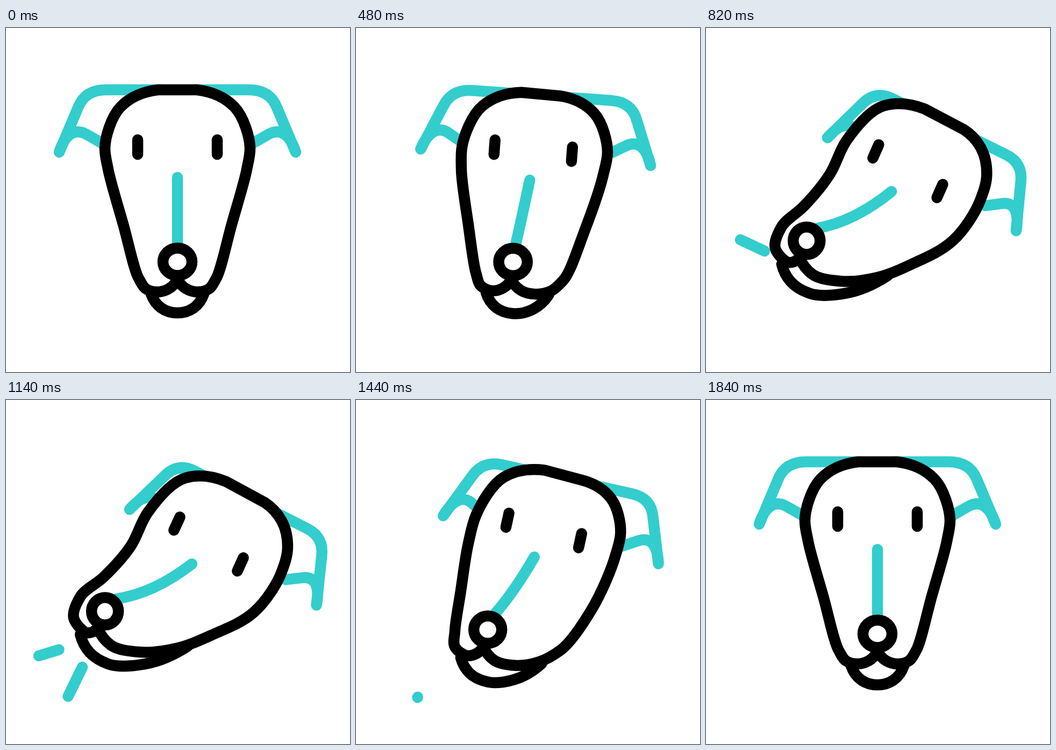
Animation, 640 px wide and 640 px high, one loop 2.4 s. Source, as an HTML page with a canvas:

```html
<!DOCTYPE html>
<html lang="en">
<head>
<meta charset="utf-8">
<title>Sniffing dog</title>
<style>
html, body { margin: 0; height: 100%; overflow: hidden; background: #fff; }
canvas { display: block; width: 100vw; height: 100vh; }
</style>
</head>
<body>
<canvas id="stage" width="640" height="640"></canvas>
<script>
const ctx = document.getElementById('stage').getContext('2d');
const TEAL = '#33cdcd', BLACK = '#000', LOOP = 2400;
const MID = 319, TOP = 115;   // symmetry axis and crown of the facing head

// Mirrored anchors: offset from the axis, y, then the left and right place when turned.
const FACE = [
  [0, 468, 170, 424, 170, 424],
  [16, 485, 162, 431, 195, 456],
  [37, 491, 151, 433, 250, 469],
  [59, 485, 126, 406, 317, 462],
  [72, 466, 138, 366, 383, 437],
  [101, 365, 182, 329, 461, 395],
  [129, 263, 232, 272, 512, 322],
  [135, 224, 264, 209, 524, 274],
  [106, 147, 334, 145, 513, 225],
  [36, 115, 410, 152, 482, 191]];
const CHIN = [
  [0, 530, 190, 491, 190, 491],
  [30, 521, 155, 469, 259, 491],
  [49, 495, 138, 436, 338, 458]];

// Sniff lines: inner end, outer end, start and end time.
const RAYS = [
  [109, 415, 64, 394, 670, 1025],
  [113, 460, 61, 476, 860, 1215],
  [142, 497, 114.5, 553.5, 1050, 1442]];

const clamp = x => Math.min(1, Math.max(0, x));
const mix = (a, b, k) => a + (b - a) * k;

// cubic-bezier(.75, 0, .25, 1)
function ease(x) {
  let lo = 0, hi = 1;
  for (let i = 0; i < 22; i++) {
    const s = (lo + hi) / 2;
    if (s * (2.25 - 3.75 * s + 2.5 * s * s) < x) lo = s; else hi = s;
  }
  return lo * lo * (3 - 2 * lo);
}

const turnAt = t =>
  1.012 * (ease(clamp((t - 160) / 850)) - ease(clamp((t - 1030) / 820)));

// Travel from the facing place (u, y) to the turned place (tx, ty) along a bowed path.
function move(u, y, tx, ty, p) {
  const v = y - TOP, bow = 4 * p * (1 - p);
  return [
    mix(MID + u, tx, p) + bow * (5 - .035 * v + .015 * u),
    mix(y, ty, p) + bow * (5.5 + 8.5 * Math.tanh((v - 210) / 70))];
}

const half = (rows, side, p) => rows.map(([u, y, lx, ly, rx, ry]) =>
  side < 0 ? move(-u, y, lx, ly, p) : move(u, y, rx, ry, p));

// Control point beside anchor i, towards its next (dir 1) or previous (dir -1) neighbour
function handle(pts, i, dir, k) {
  const [[ax, ay], [x, y], [bx, by]] = pts.slice(i - 1, i + 2);
  const la = Math.hypot(x - ax, y - ay), lb = Math.hypot(bx - x, by - y);
  const tx = ((x - ax) / la * lb + (bx - x) / lb * la) / (la + lb);
  const ty = ((y - ay) / la * lb + (by - y) / lb * la) / (la + lb);
  const h = dir * k * Math.min(dir > 0 ? lb : la, Math.sqrt(la * lb));
  return [x + tx * h, y + ty * h];
}

function spline(pts) {
  const last = pts.length - 1;
  ctx.lineTo(...pts[0]);
  for (let i = 0; i < last; i++) {
    const end = pts[i + 1];
    if (i === 0) ctx.quadraticCurveTo(...handle(pts, 1, -1, .52), ...end);
    else if (i + 1 === last) ctx.quadraticCurveTo(...handle(pts, i, 1, .52), ...end);
    else ctx.bezierCurveTo(...handle(pts, i, 1, .35), ...handle(pts, i + 1, -1, .35), ...end);
  }
}

function stroke(color, trace) {
  ctx.strokeStyle = color;
  ctx.beginPath();
  trace();
  ctx.stroke();
}

function ear(side, p) {
  const at = (offset, y) => {
    const u = side * offset, v = y - TOP;
    return move(u, y, 456 + .79 * u - .45 * v, 186 + .405 * u + .92 * v, p);
  };
  ctx.moveTo(...at(29, 115));
  ctx.lineTo(...at(133, 115));
  ctx.quadraticCurveTo(...at(172, 115), ...at(185, 148));
  ctx.lineTo(...at(220, 231));
  ctx.bezierCurveTo(...at(211, 202), ...at(193, 184), ...at(169, 198));
  ctx.lineTo(...at(139, 215));
}

function eye(side, p) {
  const [x, y] = move(side * 74, 221.5, 377 + side * 59, 268 + side * 38, p);
  const dx = -13.5 * Math.sin(.43 * p), dy = 13.5 * Math.cos(.43 * p);
  ctx.moveTo(x - dx, y - dy);
  ctx.lineTo(x + dx, y + dy);
}

function ray([x0, y0, x1, y1, start, end], t) {
  if (t <= start || t >= end) return;
  const k = (t - start) / (end - start);
  const head = 1 - (1 - clamp(k / .35)) ** 3;
  const tail = clamp((k - .4) / .6) ** 3;
  ctx.moveTo(mix(x0, x1, tail), mix(y0, y1, tail));
  ctx.lineTo(mix(x0, x1, head), mix(y0, y1, head));
}

function draw(t) {
  const p = turnAt(t);
  ctx.fillStyle = '#fff';
  ctx.fillRect(0, 0, 640, 640);
  ctx.lineWidth = 20.5;
  ctx.lineCap = ctx.lineJoin = 'round';

  stroke(TEAL, () => {
    for (const r of RAYS) ray(r, t);
    ear(-1, p);
    ear(1, p);
  });
  stroke(BLACK, () =>
    spline([...half(CHIN, -1, p).reverse(), ...half(CHIN, 1, p).slice(1)]));
  stroke(BLACK, () => {
    spline(half(FACE, -1, p));
    spline(half(FACE, 1, p).reverse());
    ctx.closePath();
    ctx.fill();
  });
  stroke(TEAL, () => {
    ctx.moveTo(...move(0, 278, 346, 305, p));
    ctx.quadraticCurveTo(...move(0, 340, 275, 360, p), ...move(0, 405, 205, 370, p));
  });
  stroke(BLACK, () => {
    eye(-1, p);
    eye(1, p);
  });
  stroke(BLACK, () => {
    ctx.ellipse(...move(0, 435, 184, 393, p), 27 - 2 * p, 25.5, 0, 0, 2 * Math.PI);
    ctx.fill();
  });
}

const t0 = performance.now();
function tick() {
  draw((performance.now() - t0) % LOOP);
  requestAnimationFrame(tick);
}
tick();
</script>
</body>
</html>
```
